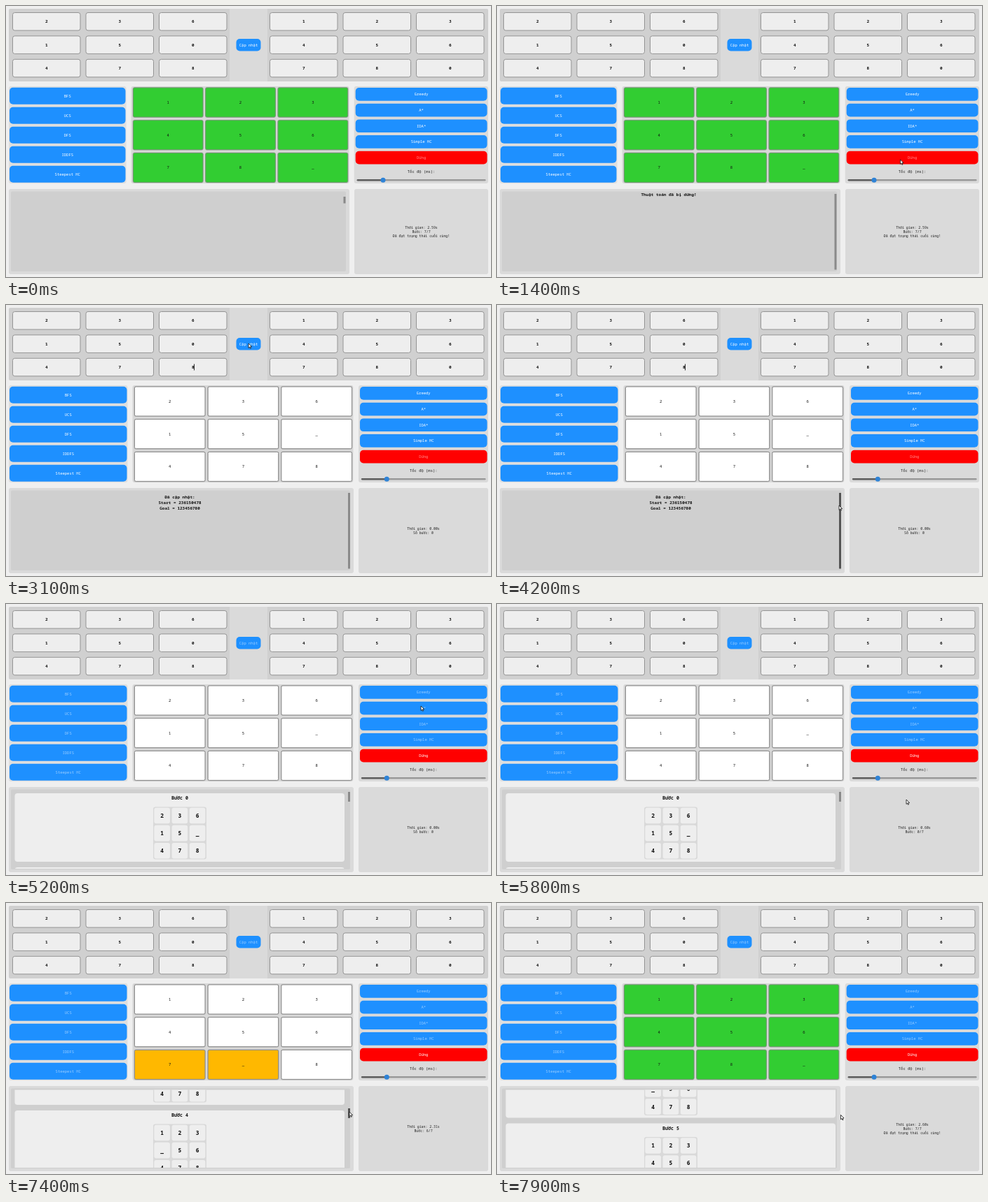
Write an HTML page with a canvas that moves like this. It is 692x388 px and loops after 8000 ms.

```html
<!DOCTYPE html>
<html lang="vi">
<head>
<meta charset="utf-8">
<title>8-puzzle</title>
<style>
html, body { margin: 0; width: 100%; height: 100%; overflow: hidden; background: #efefef; }
canvas { display: block; }
</style>
</head>
<body>
<canvas id="stage" width="692" height="388"></canvas>
<script>
const ctx = document.getElementById('stage').getContext('2d');
const LOOP = 8000, TICK = 100;
const STOPPED = 1300, UPDATED = 3100, STARTED = 5200, SOLVED = 7600;
const FIRST_STEP = 5540, STEP_MS = 287;
const START = '236150478', GOAL = '123456780';
const BLUE = '#1e90ff', RED = '#ff0000', GREEN = '#32cd32', ORANGE = '#ffb800';

// The blank's route; each board follows from the one before.
const route = [5, 2, 1, 0, 3, 6, 7, 8];
const boards = [[...START]];
for (let i = 1; i < route.length; i++) {
  const next = [...boards[i - 1]];
  next[route[i - 1]] = next[route[i]];
  next[route[i]] = '0';
  boards.push(next);
}
const stepTimes = ['0.60', '0.88', '1.16', '1.45', '1.73', '2.02', '2.31', '2.60'];

// Pointer keys: time, x, y
const pointerKeys = [
  [500, 330, 110], [800, 576, 220], [1300, 576, 220], [2100, 563, 218], [2600, 563, 218],
  [3000, 346, 55], [3500, 346, 55], [4200, 488, 287], [4400, 488, 287], [5000, 592, 146],
  [5200, 592, 146], [5800, 584, 280], [6100, 584, 280], [6700, 489, 279], [7100, 489, 279],
  [7400, 490, 299], [7900, 490.5, 303.4], [8000, 490.5, 303.4]
];

function pointerAt(t) {
  const i = pointerKeys.findIndex(key => key[0] > t);
  const [t0, x0, y0] = pointerKeys[i - 1], [t1, x1, y1] = pointerKeys[i];
  const u = (t - t0) / (t1 - t0), e = u * u * (3 - 2 * u);
  return [x0 + (x1 - x0) * e, y0 + (y1 - y0) * e];
}

function box(x, y, w, h, fill, radius = 0, stroke) {
  ctx.beginPath();
  ctx.roundRect(x, y, w, h, radius);
  ctx.fillStyle = fill;
  ctx.fill();
  if (stroke) {
    ctx.strokeStyle = stroke;
    ctx.lineWidth = 1;
    ctx.stroke();
  }
}

function label(text, x, y, size, color = '#222', weight = 400) {
  ctx.font = `${weight} ${size}px "Noto Sans Mono", "DejaVu Sans Mono", monospace`;
  ctx.fillStyle = color;
  ctx.fillText(text, x, y + size * 0.36);
}

function button(text, x, y, w, h, fill, enabled, size = 5.5) {
  box(x, y, w, h, fill, 5);
  label(text, x + w / 2, y + h / 2, size, enabled ? '#fff' : 'rgba(255,255,255,.55)');
}

function inputGrid(digits, x) {
  [...digits].forEach((digit, i) => {
    const left = x + (i % 3) * 104.5, top = 9.5 + Math.floor(i / 3) * 33.4;
    box(left, top, 96.5, 25.5, '#eee', 3, '#949494');
    label(digit, left + 48.2, top + 12.8, 6, '#111', 700);
  });
}

function drawTop(t) {
  box(4, 4, 684, 104, '#d0d0d0', 2);
  box(319, 4, 54, 104, '#dadada');
  inputGrid(START, 9.5);
  inputGrid(GOAL, 376.5);
  button('Cập nhật', 328.5, 47, 35, 17.5, BLUE, t < STARTED);
  const blinkStart = t < UPDATED ? 500 : 4000;
  const blinkPhase = (t - blinkStart + 8480) % 1060;
  if (t >= 500 && t < STARTED && blinkPhase < 530) box(268, 84.5, 0.9, 9, '#111');
}

function drawButtons(t, wide) {
  const idle = t < STARTED;
  const leftWidth = wide ? 167.5 : 165.5;
  box(4, 115, leftWidth + 2, 139, '#dedede', 3);
  ['BFS', 'UCS', 'DFS', 'IDDFS', 'Steepest HC'].forEach((name, i) =>
    button(name, 5, 116.7 + i * 28, leftWidth, 24, BLUE, idle));

  const x = wide ? 505 : 498.7, w = 686.5 - x;
  box(x - 2, 115, 690 - x, 139, '#dadada', 3);
  ['Greedy', 'A*', 'IDA*', 'Simple HC', 'Dừng'].forEach((name, i) =>
    button(name, x, 117 + i * 22.7, w, 18.7, i < 4 ? BLUE : RED, i < 4 ? idle : !idle));

  label('Tốc độ (ms):', x + w / 2, 237, 5.5);
  const knob = wide ? 543.3 : 538;
  box(x + 2, 248, 684.5 - x - 2, 2.6, '#999', 1.3);
  box(x + 2, 248, knob - x - 2, 2.6, '#606060', 1.3);
  box(knob - 3.5, 245.8, 7, 7, '#2f83d6', 3.5);
}

function drawBoard(t, wide, step) {
  const x = wide ? 183.5 : 181.5, pitch = wide ? 104.7 : 103.3, w = wide ? 100.5 : 99.5;
  const digits = wide ? boards[Math.max(step, 0)] : [...GOAL];
  box(x - 3, 115, pitch * 2 + w + 5, 139, '#d8d8d8', 3);
  digits.forEach((digit, i) => {
    const left = x + (i % 3) * pitch, top = 117 + Math.floor(i / 3) * 46.7;
    const moved = step > 0 && (i === route[step] || i === route[step - 1]);
    const fill = !wide ? GREEN : moved ? ORANGE : '#fff';
    box(left - 1, top - 1, w + 2, 44, '#b8b8b8', 3);
    box(left, top, w, 42, fill, 2, wide ? '#8c8c8c' : '#6a9a6a');
    label(digit === '0' ? '_' : digit, left + w / 2, top + 21, 5.6, '#111');
  });
}

function drawSteps(scroll) {
  boards.forEach((digits, n) => {
    const top = 271 + n * 106 - scroll;
    if (top > 380 || top < 160) return;
    box(12.5, top, 470.5, 98, '#eee', 4);
    label(`Bước ${n}`, 248, top + 7, 6.7, '#111', 700);
    box(210, top + 19.5, 76, 75, '#d9d9d9', 3);
    digits.forEach((digit, i) => {
      const cx = 222.7 + (i % 3) * 25.2, cy = top + 32 + Math.floor(i / 3) * 25.1;
      box(cx - 11.3, cy - 11.3, 22.6, 22.6, '#eee', 3);
      label(digit === '0' ? '_' : digit, cx, cy, 8, '#111', 700);
    });
  });
}

function drawLog(t, wide, pointerY) {
  const right = wide ? 496 : 490, bar = wide ? 488 : 481.5;
  const scroll = t > 7100 ? 19.9 * (pointerY - 279) : 0;
  box(4, 262, right - 4, 122, '#dadada', 3);
  box(7, 265.5, right - 12, 114.5, '#cfcfcf', 2);
  ctx.save();
  ctx.beginPath();
  ctx.rect(7, 267.5, right - 7, 111.5);
  ctx.clip();
  if (t < STOPPED) {
    box(bar, 273, 3, 9.5, '#888');
  } else if (t < STARTED) {
    const lines = t < UPDATED ? ['Thuật toán đã bị dừng!']
      : ['Đã cập nhật:', `Start = ${START}`, `Goal = ${GOAL}`];
    const y = t < UPDATED ? 270 : 275.3;
    lines.forEach((line, i) => label(line, wide ? 248 : 245, y + i * 8, 6, '#111', 700));
    box(bar, 269, 3, 108.5, t >= 4000 && t < 4500 ? '#555' : '#8a8a8a');
  } else {
    drawSteps(scroll);
    if (wide) box(bar, 269 + scroll * 0.063, 3, 14, t >= 6700 ? '#555' : '#8a8a8a');
  }
  ctx.restore();
}

function drawInfo(t, wide, step) {
  const x = wide ? 503 : 497;
  box(x, 262, 688 - x, 122, '#dadada', 3);
  let lines;
  if (!wide) lines = [`Thời gian: ${t < UPDATED ? '2.59' : '2.60'}s`, 'Bước: 7/7', 'Đã đạt trạng thái cuối cùng!'];
  else if (step < 0) lines = ['Thời gian: 0.00s', 'Số bước: 0'];
  else lines = [`Thời gian: ${stepTimes[step]}s`, `Bước: ${step}/7`];
  lines.forEach((line, i) => label(line, (x + 688) / 2, 323 + (i - (lines.length - 1) / 2) * 6.1, 4.85));
}

function drawPointer(x, y) {
  ctx.save();
  ctx.translate(x, y);
  ctx.beginPath();
  [[0, 0], [0, 6.5], [1.5, 5.2], [2.5, 7.4], [3.5, 7], [2.5, 4.8], [4.6, 4.6]]
    .forEach(point => ctx.lineTo(...point));
  ctx.closePath();
  ctx.fillStyle = '#fff';
  ctx.strokeStyle = '#111';
  ctx.lineWidth = 0.8;
  ctx.fill();
  ctx.stroke();
  ctx.restore();
}

function draw(now) {
  const t = Math.floor((now % LOOP) / TICK) * TICK;
  const wide = t >= UPDATED && t < SOLVED;
  const step = Math.min(7, Math.floor((t - FIRST_STEP) / STEP_MS));
  const pointer = t >= 500 ? pointerAt(t) : null;
  ctx.textAlign = 'center';
  box(0, 0, 692, 388, '#efefef');
  drawTop(t);
  drawButtons(t, wide);
  drawBoard(t, wide, step);
  drawLog(t, wide, pointer ? pointer[1] : 0);
  drawInfo(t, wide, step);
  if (pointer) drawPointer(...pointer);
}

const begin = performance.now();
function loop() {
  draw(performance.now() - begin);
  requestAnimationFrame(loop);
}
loop();
</script>
</body>
</html>
```
